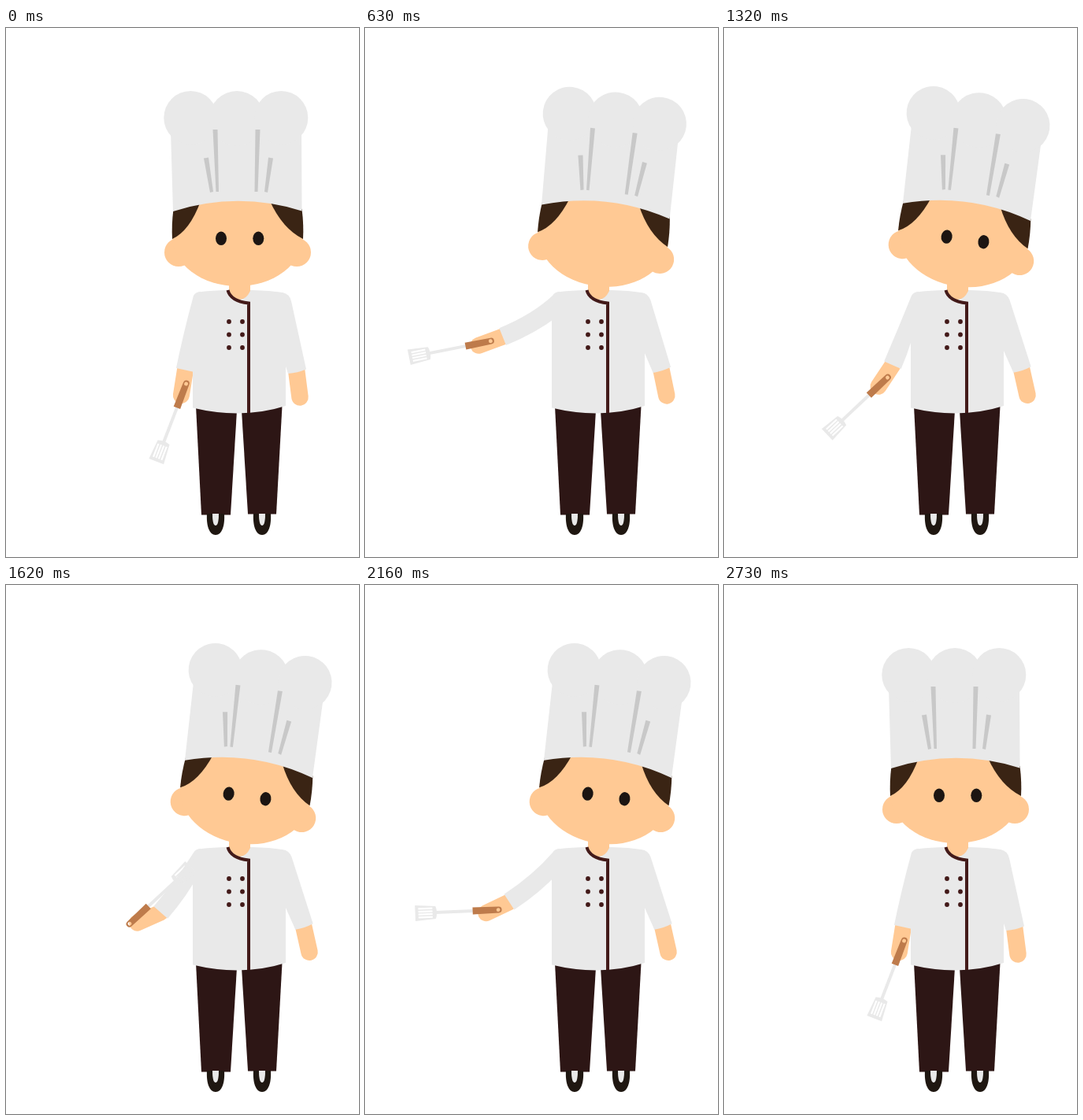
An HTML page with a canvas that plays this animation: 448x672 px, repeating every 3000 ms.

```html
<!DOCTYPE html>
<html lang="en">
<head>
<meta charset="utf-8">
<title>Chef</title>
<style>
  html, body { margin: 0; width: 100%; height: 100%; overflow: hidden; background: #fff; }
  canvas { display: block; width: 448px; height: 672px; }
</style>
</head>
<body>
<canvas id="stage" width="448" height="672"></canvas>
<script>
const ctx = document.getElementById('stage').getContext('2d');
const LOOP = 3000, STEP = 30;
const CLOTH = '#e9e9e9', SKIN = '#ffc994', HAIR = '#3a2414', TRIM = '#431a19',
      PANTS = '#2d1615', SHOE = '#1f1711', EYE = '#1c1512', FOLD = '#c8c8c8', WOOD = '#be7b4b';

// [time in ms, angle in degrees], eased between neighbours
const keys = {
  head:    [[330, 0], [750, 8], [2220, 8], [2730, 0]],
  arm:     [[330, 0], [770, 73], [1260, 11], [1920, 42.6], [2220, 45], [2730, 0]],
  forearm: [[330, 0], [770, 79], [1260, 23], [1720, 61.5], [1920, 61], [2220, 55], [2730, 0]],
  spatula: [[330, 21], [770, 96], [1260, -320], [1920, 7.5], [2220, 96], [2730, 21]]
};
const blinks = [[570, 690], [1140, 1230]];

const rad = deg => deg * Math.PI / 180;
const ease = p => (1 - Math.cos(Math.PI * p)) / 2;

// Point at a distance from (x, y); 0 degrees is straight down, positive swings left
const swing = (x, y, length, deg) => [x - length * Math.sin(rad(deg)), y + length * Math.cos(rad(deg))];

function valueAt(track, t) {
  if (t <= track[0][0]) return track[0][1];
  for (let i = 1; i < track.length; i++) {
    const [t0, a] = track[i - 1], [t1, b] = track[i];
    if (t < t1) return a + (b - a) * ease((t - t0) / (t1 - t0));
  }
  return track[track.length - 1][1];
}

function fill(d, color, rule = 'nonzero') {
  ctx.fillStyle = color;
  ctx.fill(new Path2D(d), rule);
}

function stroke(d, color, width, cap = 'butt') {
  ctx.strokeStyle = color;
  ctx.lineWidth = width;
  ctx.lineCap = cap;
  ctx.stroke(new Path2D(d));
}

function oval(x, y, rx, ry, color) {
  ctx.fillStyle = color;
  ctx.beginPath();
  ctx.ellipse(x, y, rx, ry, 0, 0, 2 * Math.PI);
  ctx.fill();
}

function turned(x, y, deg, draw) {
  ctx.save();
  ctx.translate(x, y);
  ctx.rotate(rad(deg));
  ctx.translate(-x, -y);
  draw();
  ctx.restore();
}

function legs() {
  fill('M241 480L293 486L285 618.5H248Z', PANTS);
  fill('M299 486L350.5 480L343 617.5H307Z', PANTS);
  for (const x of [266, 325]) {
    ctx.save();
    ctx.translate(x, 0);
    fill('M-11 617C-12 632 -8 644 0 644S12 632 11 617Z', SHOE);
    fill('M-4 617Q-4 632 0 632Q4 632 4 617Z', CLOTH);
    ctx.restore();
  }
}

function rightArm(deg) {
  turned(350, 340, deg, () => {
    stroke('M368 430L373 469', SKIN, 21.5, 'round');
    fill('M335 335L351 336Q360 338 362 347L381 433.5Q370 438 358 439L345 400Z', CLOTH);
  });
}

function jacket() {
  fill('M237 352Q237 337 248 335Q262 333.5 281 333H312Q336 333.5 350 336Q355 338 355 352V480Q300 497.5 237 482.5Z', CLOTH);
  fill('M283 320H310V334Q305 345 296 345Q287 343 283 334Z', SKIN);
  stroke('M281.5 333Q285 347 308 349.5V489', TRIM, 4);
  for (const x of [283, 300]) for (const y of [373, 389.5, 406]) oval(x, y, 2.9, 2.9, TRIM);
}

function spatula(x, y, deg) {
  ctx.save();
  ctx.translate(x, y);
  ctx.rotate(rad(deg));
  let blade = 'M-8 65Q0 62 8 65L10 91H-10Z';
  for (const sx of [-6.6, -2.9, .7, 4.4]) blade += `M${sx} 69H${sx + 2.2}V87H${sx}Z`;
  fill('M-2 17H2V66H-2Z', CLOTH);
  fill(blade, CLOTH, 'evenodd');
  fill('M-4 -15Q-4 -19 0 -19Q4 -19 4 -15L4.5 18H-4.5ZM-2.4 -14.5a2.4 2.4 0 1 0 4.8 0a2.4 2.4 0 1 0 -4.8 0Z', WOOD, 'evenodd');
  ctx.restore();
}

// The elbow bends softly: the cuff turns further than the whole arm swings
function leftArm(arm, forearm, tool) {
  const reach = 96.3 - 8 * Math.sin(rad(arm * 1.5));
  const [cx, cy] = swing(246, 340, reach, 11.1 + arm * .76);
  const c = Math.cos(rad(arm)), s = Math.sin(rad(arm));
  const joint = (x, y) => [cx + x * c - y * s, cy + x * s + y * c];
  const [hx, hy] = swing(cx, cy, 32.5, 9 + forearm);
  stroke(`M${cx} ${cy}L${hx} ${hy}`, SKIN, 21, 'round');
  fill(`M247 335Q241 335 238 340Q${joint(-2.5, -46.5)} ${joint(-11.5, -2.5)}` +
       `L${joint(11.5, 2.5)}Q${joint(19.5, -36.5)} 245 366Z`, CLOTH);
  const lift = 1 + 11 * Math.sin(rad(tool) / 2) ** 4;
  return [hx + 1, hy - lift, tool];
}

function head(deg, eyesOpen) {
  turned(293, 335, deg, () => {
    oval(219, 285, 18, 18, SKIN);
    oval(369, 285, 18, 18, SKIN);
    oval(294, 265, 83, 63, SKIN);
    fill('M212.5 230Q210 250 211 268Q233 258 247 220Z', HAIR);
    fill('M375.5 230Q378 250 377 268Q351 255 335 220Z', HAIR);
    if (eyesOpen) for (const x of [273, 320.3]) oval(x, 267.3, 7, 8.7, EYE);
    fill('M209 130L212 233Q294 207 375.5 232.5L375 130L349 100H235Z', CLOTH);
    oval(234.3, 114, 34, 34, CLOTH);
    oval(293, 115, 35, 35, CLOTH);
    oval(349.3, 114, 34, 34, CLOTH);
    fill('M262.5 129H268.5L270 208H266.5Z', FOLD);
    fill('M251 165.5L257 164.5L263 208L259 209Z', FOLD);
    fill('M316.5 129H322.5L319.5 208H315.5Z', FOLD);
    fill('M333 164.5L339 165.5L332 209L328 208Z', FOLD);
  });
}

function draw(now) {
  const t = Math.floor((now % LOOP) / STEP) * STEP;
  const at = name => valueAt(keys[name], t);
  const tilt = at('head');
  ctx.fillStyle = '#fff';
  ctx.fillRect(0, 0, 448, 672);
  legs();
  rightArm(-tilt * .675);
  const grip = leftArm(at('arm'), at('forearm'), at('spatula'));
  head(tilt, !blinks.some(([a, b]) => t >= a && t < b));
  jacket();
  spatula(...grip);
}

const start = performance.now();
function tick() {
  draw(performance.now() - start);
  requestAnimationFrame(tick);
}
tick();
</script>
</body>
</html>
```
